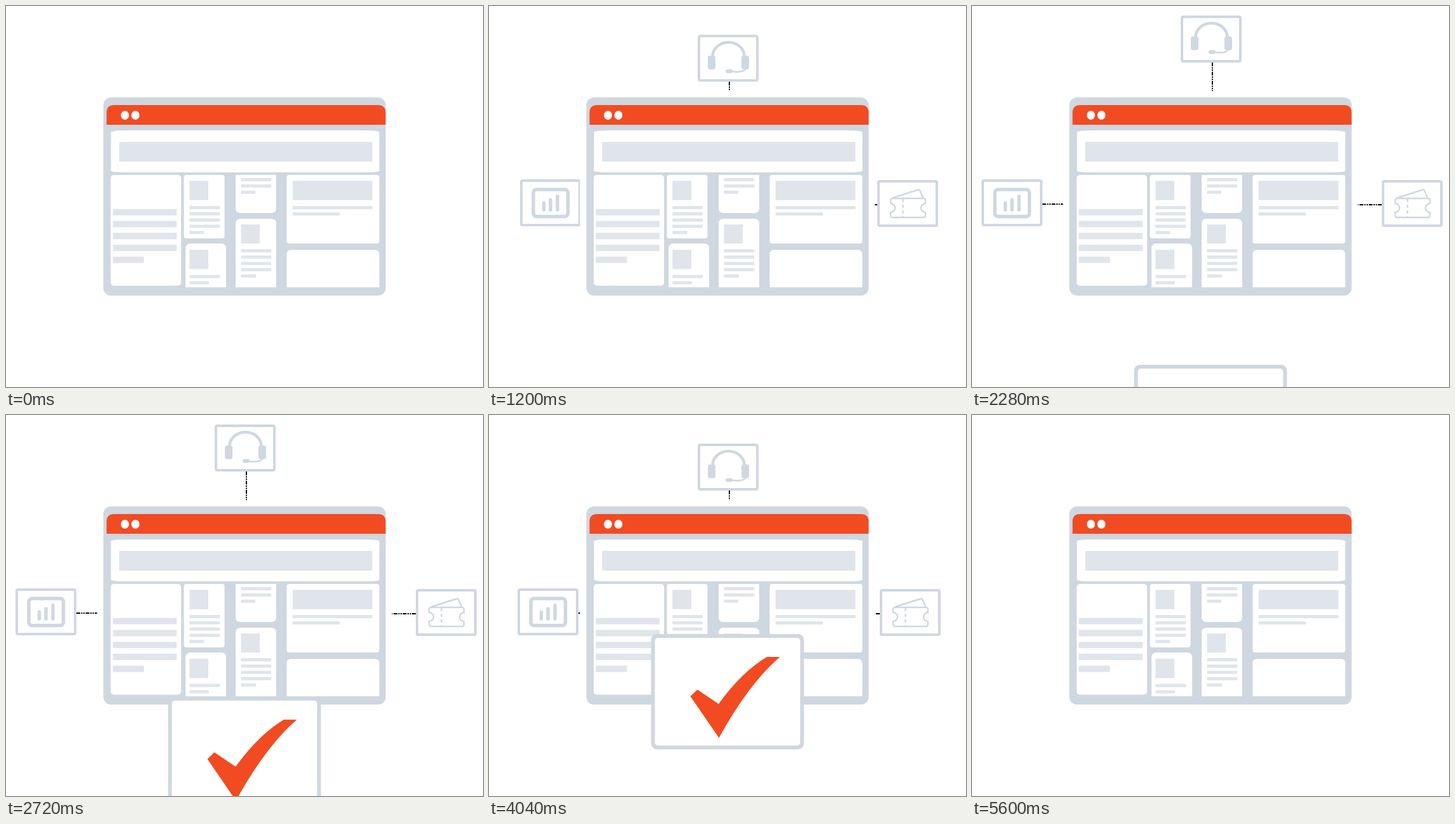
Animation, 752 px wide and 600 px high, one loop 5.8 s. Source, as an HTML page:

```html
<!DOCTYPE html>
<html lang="en">
<head>
<meta charset="utf-8">
<title>Browser window with tools</title>
<style>
  html, body { margin: 0; width: 100%; height: 100%; overflow: hidden; background: #fff; }
  svg { display: block; width: 752px; height: 600px; }
  .white { fill: #fff; }
  .frame { fill: #cfd7e0; }
  .bars { fill: #e0e4eb; }
  .accent { fill: #f24b22; }
  .card { fill: #fff; stroke: #cfd7e2; stroke-width: 4; }
  .icon { fill: none; stroke: #cfd7e2; stroke-linecap: round; stroke-linejoin: round; }
  .solid { fill: #cfd7e2; }
  .link { fill: none; stroke: #000; stroke-width: 2; stroke-dasharray: 6 1.5 2 1.5 2 1.5; }
</style>
</head>
<body>
<svg viewBox="0 0 752 600">
  <defs>
    <clipPath id="leftArea"><path d="M0 0H143.5V600H0z"/></clipPath>
    <clipPath id="topArea"><path d="M0 0H752V134H0z"/></clipPath>
    <clipPath id="rightArea"><path d="M608.5 0H752V600H608.5z"/></clipPath>
    <rect id="card" class="card" x="2" y="2" width="92" height="70" rx="2"/>
  </defs>

  <g id="tools">
    <g clip-path="url(#leftArea)"><g id="chart">
      <path class="link" d="M96 39H230"/>
      <use href="#card"/>
      <rect class="icon" x="21" y="16" width="54.5" height="42.5" rx="5" stroke-width="5.5"/>
      <path class="icon" stroke-width="5.4" d="M37.5 37.2V48M48 32.2V48M59 26.7V48"/>
    </g></g>

    <g clip-path="url(#topArea)"><g id="headset">
      <path class="link" d="M50 74V200"/>
      <use href="#card"/>
      <path class="icon" stroke-width="4.5" d="M23.5 35V34A25 22 0 0 1 73.5 34V35"/>
      <path class="icon" stroke-width="2.5" d="M75 53C75 57 68 59.5 54 58"/>
      <g class="solid">
        <rect x="16" y="33" width="12" height="21.5" rx="3.5"/>
        <rect x="69" y="33" width="12" height="21.5" rx="3.5"/>
        <rect x="44" y="54.5" width="11" height="6" rx="3"/>
      </g>
    </g></g>

    <g clip-path="url(#rightArea)"><g id="ticket">
      <path class="link" d="M0 39H-134"/>
      <use href="#card"/>
      <g class="icon" stroke-width="2.4">
        <path d="M24 29H73a3 3 0 0 1 3 3v5a7 7 0 0 0 0 14v5a3 3 0 0 1-3 3H24a3 3 0 0 1-3-3v-5a7 7 0 0 0 0-14v-5a3 3 0 0 1 3-3z"/>
        <path d="M25 28 64 15.5q2.5-.8 3.5 1.5L72 28"/>
        <path d="M40.5 30V58" stroke-dasharray="5 4" stroke-linecap="butt"/>
      </g>
    </g></g>
  </g>

  <rect class="frame" x="153.5" y="144" width="445" height="312" rx="12"/>
  <path class="accent" d="M158.5 187V168q0-12 12-12H586.500q12 0 12 12V187z"/>
  <g class="white">
    <ellipse cx="187.500" cy="172" rx="6.4" ry="7"/>
    <ellipse cx="204" cy="172" rx="6.4" ry="7"/>
    <path d="M165.500 198Q172 196 186 196H568Q582 196 588.500 198V260Q582 262 568 262H186Q172 262 165.500 260z"/>
    <rect x="165" y="266" width="111" height="174.500" rx="5"/>
    <rect x="280.500" y="266" width="64" height="100" rx="4"/>
    <path d="M283 443V382q0-8 8-8H339q8 0 8 8V443z"/>
    <path d="M362 266H426V318q0 8-8 8H370q-8 0-8-8z"/>
    <path d="M362 443V343q0-8 8-8H418q8 0 8 8V443z"/>
    <rect x="442.500" y="266" width="146" height="108" rx="4"/>
    <path d="M442.500 443V391q0-7 7-7H581.500q7 0 7 7V443z"/>
  </g>
  <g class="bars" id="bars"></g>

  <g id="done">
    <rect class="frame" x="255.500" y="345" width="241" height="181.500" rx="9"/>
    <rect class="white" x="261.500" y="351" width="229" height="169.500" rx="5"/>
    <path class="accent" d="M317.500 443 328.500 432.500 362 455Q398 405 438 381H458.500Q409 424 362.500 508.500z"/>
  </g>
</svg>
<script>
const LOOP = 5800, STEP = 40;
const $ = id => document.getElementById(id);

// Placeholder content of the window
const bar = (x, y, w, h = 5) => `<rect x="${x}" y="${y}" width="${w}" height="${h}"/>`;
const lines = (x, y, widths, gap = 9.9, h = 5) =>
  widths.map((w, i) => bar(x, y + i * gap, w, h)).join("");
$("bars").innerHTML =
  bar(178.5, 214, 399, 31) +
  lines(168.5, 319.7, [100.5, 100.5, 100.5, 100.5, 49], 18.75, 10) +
  bar(289.3, 275.3, 29.7, 30.5) + lines(289.3, 315, [47.7, 47.7, 47.7, 47.7, 23], 9.8) +
  bar(289.3, 383.8, 29.7, 30.5) + lines(289.3, 423.5, [47.7, 30.5]) +
  lines(370.5, 271, [47.7, 47.7, 22.5]) +
  bar(370.5, 344, 29.7, 30) + lines(370.5, 383, [47.7, 47.7, 47.7, 47.7, 23.5]) +
  bar(451.8, 275.3, 125.9, 30.5) + lines(451.8, 315, [125.9, 74.3]);

// Cubic Bezier easing solved by bisection
const bezier = (x1, y1, x2, y2) => u => {
  if (u <= 0 || u >= 1) return u <= 0 ? 0 : 1;
  const at = (s, a, b) => 3 * (1 - s) ** 2 * s * a + 3 * (1 - s) * s * s * b + s ** 3;
  let lo = 0, hi = 1;
  for (let i = 0; i < 24; i++) {
    const mid = (lo + hi) / 2;
    if (at(mid, x1, x2) < u) lo = mid; else hi = mid;
  }
  return at(lo, y1, y2);
};
const toolsIn = bezier(.2, .08, .6, 1);
const doneIn = bezier(.23, 0, .6, 1);
const easeOut = u => (1 - Math.cos(Math.PI * Math.min(1, Math.max(0, u)))) / 2;

const move = (id, x, y) => $(id).setAttribute("transform", `translate(${x} ${y})`);
const show = (id, on) => $(id).setAttribute("visibility", on ? "visible" : "hidden");

function draw(t) {
  const leaving = t > 3000;
  const hidden = leaving
    ? 135 * easeOut((t - 3765) / 880)
    : 129 * (1 - toolsIn((t - 400) / 1360));
  move("chart", 15 + hidden, 273);
  move("headset", 329, 15 + hidden * (leaving ? 1 : .89));
  move("ticket", 646 - hidden, 274);
  show("tools", t >= 440 && t < 4520);

  const drop = t > 4000
    ? 270 * easeOut((t - 4748) / 1004)
    : 255 * (1 - doneIn((t - 2040) / 1320));
  move("done", 0, drop);
  show("done", t >= 2080 && t < 5600);
}

const start = performance.now();
function tick() {
  const t = (performance.now() - start) % LOOP;
  draw(Math.floor(t / STEP) * STEP);
  requestAnimationFrame(tick);
}
tick();
</script>
</body>
</html>
```
